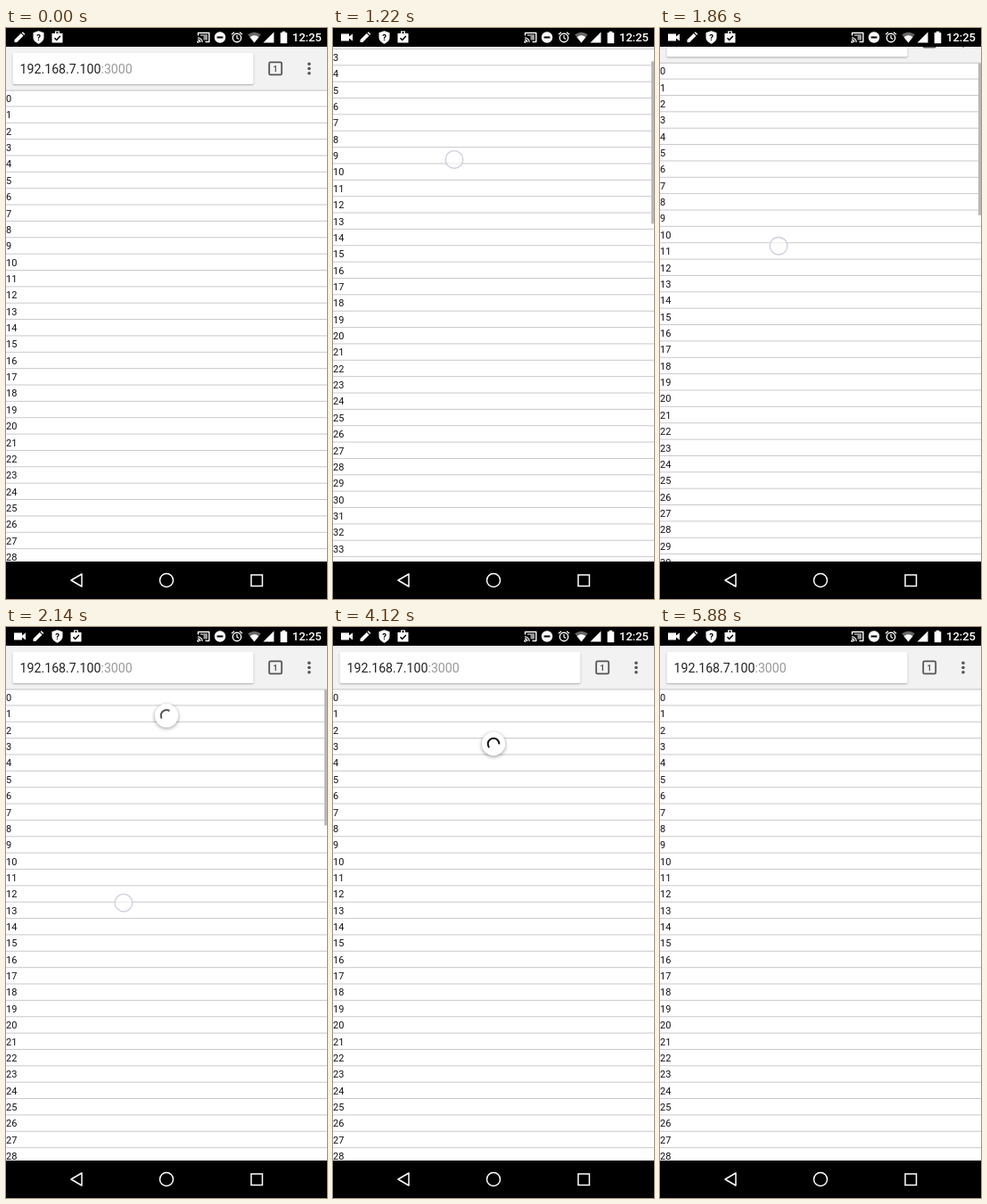
An HTML page with a canvas that plays this animation: 360 by 640 pixels, repeating every 5.9 s.

```html
<!DOCTYPE html>
<html lang="en">
<head>
<meta charset="utf-8">
<title>Pull to refresh</title>
<style>
html, body { margin: 0; width: 100%; height: 100%; overflow: hidden; background: #fff; }
canvas { display: block; }
</style>
</head>
<body>
<canvas id="stage" width="360" height="640"></canvas>
<script>
const c = document.getElementById('stage').getContext('2d');
const LOOP = 5900, TAU = Math.PI * 2, DEG = Math.PI / 180;
const ROW = 18.36, ROWS = 100, STATUS = 21, BAR = 49, NAV = 598;
const LAG = 80, GRAB = 253, RELEASE = 3000, CYCLE = 1332, SPIN = RELEASE + CYCLE / 2;

// Finger path: time, x, y
const path = [
  [600, 136.5, 262], [700, 136.5, 248], [860, 136, 207], [940, 136, 194],
  [1140, 136, 152], [1220, 136, 147.5], [1320, 135.5, 146], [1500, 135, 160],
  [1780, 133.5, 222], [1860, 133, 244], [2100, 132, 302], [2460, 131.5, 352],
  [2840, 131, 381], [3020, 130, 391]
];

const clamp = (v, a = 0, b = 1) => Math.min(b, Math.max(a, v));
const ramp = (t, a, b) => clamp((t - a) / (b - a));
const ease = u => u * u * (3 - 2 * u);
const easeOut = u => 1 - (1 - u) ** 2;

function finger(t) {
  const n = path.length;
  t = clamp(t, path[0][0], path[n - 1][0]);
  let i = 0;
  while (i < n - 2 && t > path[i + 1][0]) i++;
  const a = path[i], b = path[i + 1], p = path[i - 1] || a, q = path[i + 2] || b;
  const h = b[0] - a[0], u = (t - a[0]) / h;
  return [1, 2].map(k => {
    const m = (b[k] - p[k]) / (b[0] - p[0]) * h, w = (q[k] - a[k]) / (q[0] - a[0]) * h;
    return (1 + 2 * u) * (1 - u) ** 2 * a[k] + u * (1 - u) ** 2 * m
      + u * u * (3 - 2 * u) * b[k] + u * u * (u - 1) * w;
  });
}

function rect(x, y, w, h, color) {
  c.fillStyle = color;
  c.fillRect(x, y, w, h);
}
function disc(x, y, r, color) {
  c.fillStyle = color;
  c.beginPath();
  c.arc(x, y, r, 0, TAU);
  c.fill();
}
function ring(x, y, r, color, width, from = 0, to = TAU) {
  c.strokeStyle = color;
  c.lineWidth = width;
  c.beginPath();
  c.arc(x, y, r, from, to);
  c.stroke();
}
function text(s, x, y, font, color, align = 'left') {
  c.font = font + ' Roboto, sans-serif';
  c.fillStyle = color;
  c.textAlign = align;
  c.fillText(s, x, y);
}
function shape(d, x, y, color, width) {
  c.save();
  c.translate(x, y);
  const p = new Path2D(d);
  if (width) {
    c.strokeStyle = color;
    c.lineWidth = width;
    c.lineJoin = 'round';
    c.stroke(p);
  } else {
    c.fillStyle = color;
    c.fill(p);
  }
  c.restore();
}
function shadow(blur, dy, alpha) {
  c.shadowColor = `rgba(0,0,0,${alpha})`;
  c.shadowBlur = blur;
  c.shadowOffsetY = dy;
}

function list(top) {
  for (let i = 0; i < ROWS; i++) {
    const y = top + i * ROW;
    if (y < -ROW || y > NAV) continue;
    text(i, 0, y + 13, '11px', '#111');
    rect(0, y + 17.4, 360, 1, '#c9c9c9');
  }
}

function toolbar(dy) {
  c.save();
  c.translate(0, -dy);
  rect(0, STATUS, 360, BAR, '#f2f2f2');
  rect(0, 69.5, 360, 1, '#c4c4c4');
  c.save();
  shadow(2, 1, 0.3);
  c.beginPath();
  c.roundRect(7.5, 28, 270, 35, 1.5);
  c.fillStyle = '#fff';
  c.fill();
  c.restore();
  const host = '192.168.7.100';
  text(host, 15.5, 51, '14.2px', '#222');
  text(':3000', 15.5 + c.measureText(host).width, 51, '14.2px', '#999');
  c.strokeStyle = '#555';
  c.lineWidth = 1.8;
  c.beginPath();
  c.roundRect(295.2, 38.4, 14, 14, 1.5);
  c.stroke();
  text('1', 302.2, 48.7, 'bold 9px', '#555', 'center');
  for (const y of [40.2, 45.5, 50.8]) disc(340, y, 1.8, '#555');
  c.restore();
}

function statusBar(t) {
  const W = '#fff', K = '#000', u = ramp(t, 0, 90), shift = 21 * ease(u);
  rect(0, 0, 360, STATUS, K);
  c.globalAlpha = u;
  shape('M-6-4H3V-1L7-4V4L3 1V4H-6Z', 15, 10.5, W);
  c.globalAlpha = 1;
  c.save();
  c.translate(shift, 0);
  shape('M-5.5 5.5V2.8L1.8-4.5 4.5-1.8-2.8 5.5ZM2.6-5.3L3.7-6.3 6.3-3.7 5.3-2.6Z', 15, 10.5, W);
  shape('M0-7L6-5V0C6 4 3 6.2 0 7.5C-3 6.2-6 4-6 0V-5Z', 36.5, 10.3, W);
  text('?', 36.5, 14, 'bold 9.5px', K, 'center');
  shape('M-6-4H-2.5V-6.5H2.5V-4H6V6.5H-6Z', 57.5, 10, W);
  rect(56.2, 4.6, 2.6, 1.4, K);
  shape('M-3 1.2L-.8 3.4 3.4-1', 57.5, 10, K, 1.5);
  c.restore();

  shape('M-6-2V-5H6.3V5H2', 221.5, 10.5, W, 1.4);
  rect(218, 7.3, 8, 6.2, '#999');
  rect(214.5, 9, 7, 7, K);
  for (const r of [2.8, 5.2]) ring(215, 16, r, W, 1.2, -TAU / 4, 0);
  disc(215.4, 15.6, 1.2, W);
  disc(240, 10.5, 6.2, W);
  rect(236.6, 9.5, 6.8, 2, K);
  ring(259, 11, 4.7, W, 1.4);
  shape('M0-2.8V.5L2.2 1.8M-6-3.6L-3-6.1M6-3.6L3-6.1', 259, 10.8, W, 1.2);
  shape('M0 6L-7.3-3.2Q0-8.4 7.3-3.2Z', 278.5, 10.5, '#666');
  shape('M0 6L-5-.3Q0-4 5-.3Z', 278.5, 10.5, W);
  shape('M6-6V6H-6Z', 294.5, 10.5, W);
  rect(307.7, 5.2, 7.6, 12, W);
  rect(309.7, 3.8, 3.6, 2, W);
  text('12:25', 321, 15.3, '500 13px', W);
}

function navBar() {
  rect(0, NAV, 360, 42, '#000');
  shape('M5.5-7V7L-6.5 0Z', 79.5, 619, '#fff', 1.5);
  ring(180, 619, 7.5, '#fff', 1.5);
  c.strokeRect(275, 613, 12.5, 12.5);
}

// Start angle and sweep of the refresh arc, in degrees
function arcPose(t, x) {
  if (t < RELEASE) {
    const drift = 15 * ramp(t, 2840, RELEASE);
    return [235 - 200 * (1 - x) + drift, 265 * x];
  }
  if (t < SPIN) {
    const u = ease(ramp(t, RELEASE, SPIN));
    return [250 + 536 * u, 265 - 247 * u];
  }
  const n = (t - SPIN) / CYCLE, turn = Math.floor(n), p = n - turn;
  const grow = ease(ramp(p, 0, 0.5)), trim = ease(ramp(p, 0.5, 1));
  return [66 + 216 * n + 270 * (turn + trim), 18 + 270 * (grow - trim)];
}

function spinner(t) {
  if (t < 1900 || t >= 5870) return;
  const pull = Math.max(0, finger(t - LAG)[1] - GRAB);
  if (!pull) return;
  const x = easeOut(clamp(pull / 118)), size = 1 - ramp(t, 5710, 5870);
  const [start, sweep] = arcPose(t, x);
  c.save();
  c.beginPath();
  c.rect(0, 70, 360, NAV - 70);
  c.clip();
  c.translate(180, 56 + 75 * x);
  c.scale(size, size);
  c.save();
  shadow(4, 1.2, 0.4);
  disc(0, 0, 13.2, '#fff');
  c.restore();
  c.globalAlpha = t < RELEASE ? 0.3 + 0.7 * x : 1;
  ring(0, 0, 6.3, '#111', 2, start * DEG, (start + sweep) * DEG);
  c.restore();
}

function draw(t) {
  const offset = t < 660 ? 0 : Math.max(0, GRAB - finger(t - LAG)[1]);
  const hidden = Math.min(BAR, offset), scroll = offset - hidden;
  const top = 70 - hidden, view = NAV + 1 - top, total = ROWS * ROW;
  rect(0, 0, 360, 640, '#fff');
  list(70 - offset);

  c.globalAlpha = ramp(t, 700, 760) * (1 - ramp(t, 3300, 3600));
  rect(357, top + scroll * view / total, 3, view * view / total, '#b8b8b8');
  c.globalAlpha = 1;

  toolbar(hidden);
  spinner(t);
  if (t >= 660 && t < 3040) {
    const [x, y] = finger(t);
    disc(x, y, 10, 'rgba(255,255,255,.6)');
    ring(x, y, 9.8, '#cfcfdc', 1.4);
  }
  statusBar(t);
  navBar();
}

function frame() {
  draw(performance.now() % LOOP);
  requestAnimationFrame(frame);
}
frame();
</script>
</body>
</html>
```
